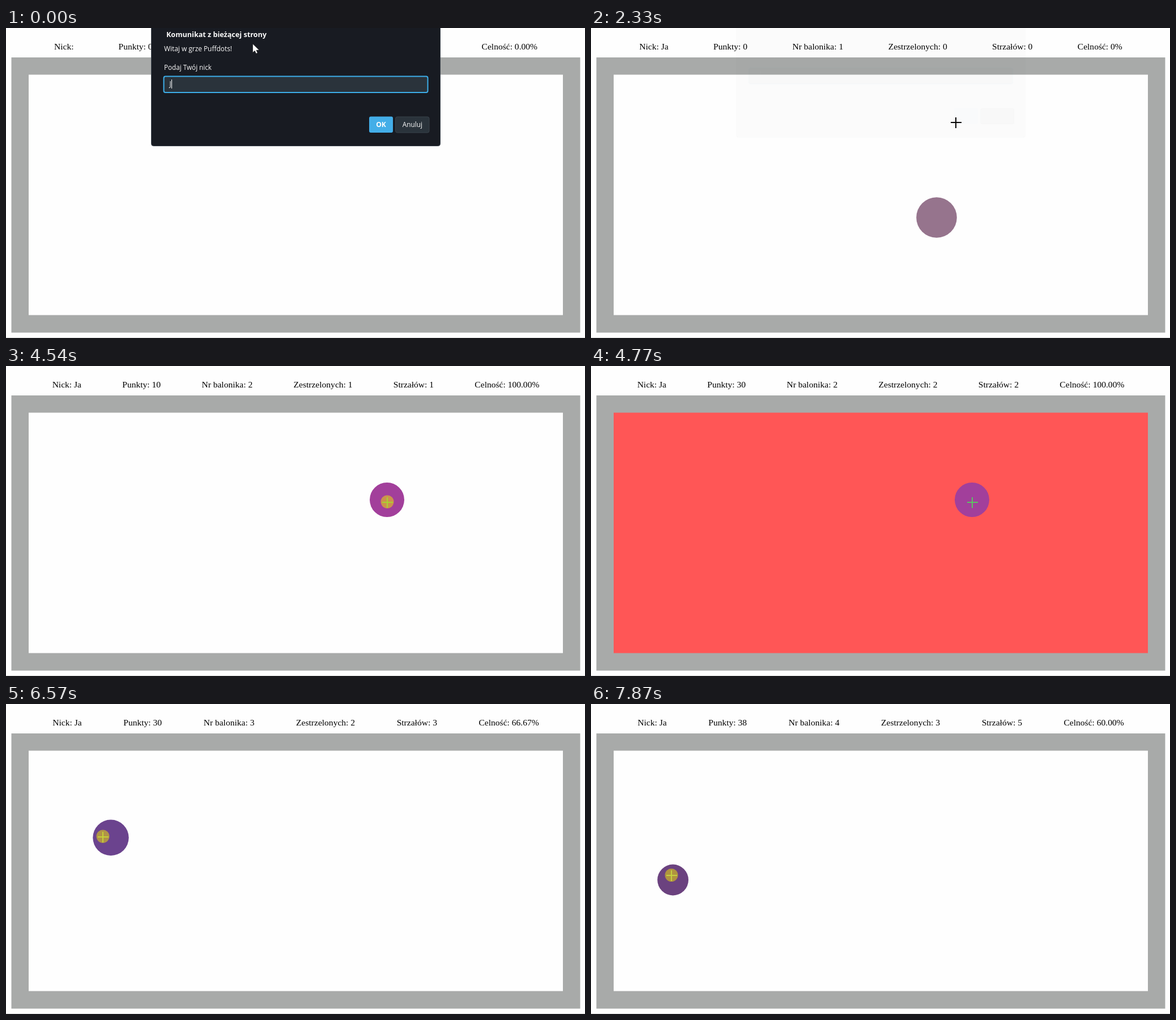
An HTML page with a canvas that plays this animation: 1022 by 548 pixels, repeating every 8000 ms.

```html
<!DOCTYPE html>
<html lang="pl">
<head>
<meta charset="utf-8">
<title>Gra zręcznościowa</title>
<style>
html, body { margin: 0; width: 100%; height: 100%; overflow: hidden; background: #fefefe; }
canvas { display: block; }
</style>
</head>
<body>
<canvas id="stage" width="1022" height="548"></canvas>
<script>
const ctx = document.getElementById('stage').getContext('2d');
const LOOP = 8000;
const SERIF = '15.55px "Liberation Serif", serif';
const sans = (size, weight = 400) => `${weight} ${size}px "Open Sans", sans-serif`;

// Pointer moves: first update, last update, number of updates, destination
const moves = [
  [610, 1390, 11, 616, 157],
  [1460, 1770, 5, 632, 154],
  [1920, 2020, 2, 644, 167],
  [2640, 2960, 5, 598, 270],
  [3040, 3120, 2, 612, 313],
  [3770, 4390, 9, 673, 241],
  [4998, 5460, 7, 266, 228],
  [5540, 5700, 3, 223, 235],
  [5780, 5780, 1, 220, 235],
  [6330, 6400, 2, 171, 235],
  [7120, 7340, 4, 131, 288],
  [7570, 7720, 3, 142, 303]
];

// Click highlights: from, to, centre
const clicks = [
  [3360, 3530, 611.5, 312],
  [4540, 4770, 673, 240],
  [6010, 6160, 219, 234],
  [6570, 6720, 171, 234],
  [7870, 8000, 142, 302.5]
];

const flashes = [[3530, 3690], [4770, 4920], [6720, 6870]];

// Discs to shoot: appearance, centre, radius, colour
const discs = [
  [2170, 610, 335, 35.8, '#96748d'],
  [3690, 672.5, 236.5, 30.5, '#a23f9b'],
  [4920, 185, 236.3, 31.7, '#6b438e'],
  [6870, 144.6, 311, 27.4, '#6b427f']
];

// Scores: time, nick, points, disc number, hits, shots, accuracy
const scores = [
  [0, '', 0, 0, 0, 0, '0.00%'],
  [2170, ' Ja', 0, 1, 0, 0, '0%'],
  [3530, ' Ja', 10, 1, 1, 1, '100.00%'],
  [3690, ' Ja', 10, 2, 1, 1, '100.00%'],
  [4770, ' Ja', 30, 2, 2, 2, '100.00%'],
  [4920, ' Ja', 30, 3, 2, 2, '100.00%'],
  [6160, ' Ja', 30, 3, 2, 3, '66.67%'],
  [6720, ' Ja', 38, 3, 3, 4, '75.00%'],
  [6870, ' Ja', 38, 4, 3, 5, '60.00%']
];

const latest = (list, t) => list.filter(item => item[0] <= t).pop();
const active = (list, t) => list.find(([from, to]) => t >= from && t < to);

function rect(x, y, w, h, color) {
  ctx.fillStyle = color;
  ctx.fillRect(x, y, w, h);
}

function box(x, y, w, h, r, fill, stroke, line = 1) {
  ctx.beginPath();
  ctx.roundRect(x, y, w, h, r);
  ctx.fillStyle = fill;
  ctx.fill();
  if (!stroke) return;
  ctx.strokeStyle = stroke;
  ctx.lineWidth = line;
  ctx.stroke();
}

function circle(x, y, r, color) {
  ctx.beginPath();
  ctx.arc(x, y, r, 0, Math.PI * 2);
  ctx.fillStyle = color;
  ctx.fill();
}

function text(str, x, y, font, color, align = 'left') {
  ctx.font = font;
  ctx.fillStyle = color;
  ctx.textAlign = align;
  ctx.fillText(str, x, y);
}

function pointer(t) {
  let x = 435.5, y = 28;
  for (const [start, end, count, toX, toY] of moves) {
    if (t < start) break;
    const step = (end - start) / (count - 1) || 1;
    const p = Math.min(1, (Math.floor((t - start) / step + 1e-6) + 1) / count);
    const e = p * p * (3 - 2 * p);
    x += (toX - x) * e;
    y += (toY - y) * e;
  }
  return [x, y];
}

function drawHeader(t) {
  const [, nick, points, number, hits, shots, accuracy] = latest(scores, t);
  const labels = [`Nick:${nick}`, `Punkty: ${points}`, `Nr balonika: ${number}`,
    `Zestrzelonych: ${hits}`, `Strzałów: ${shots}`, `Celność: ${accuracy}`];
  ctx.font = SERIF;
  const widths = labels.map(label => ctx.measureText(label).width);
  const gap = (932 - widths.reduce((a, b) => a + b)) / labels.length;
  let x = 45.5 + gap / 2;
  labels.forEach((label, i) => {
    text(label, x, 38, SERIF, '#000');
    x += widths[i] + gap;
  });
}

function drawField(t) {
  rect(0, 0, 1022, 548, '#fefefe');
  rect(0, 547, 1022, 1, '#dcdcdc');
  rect(9.5, 52, 1004, 486.5, '#a8aaa9');
  rect(40, 82.5, 943, 425, active(flashes, t) ? '#ff5656' : '#fefefe');
  const disc = latest(discs, t);
  if (disc) circle(...disc.slice(1));
}

function drawDialog(t) {
  if (t >= 2410) return;
  ctx.save();
  if (t >= 2170) {
    const step = Math.floor((t - 2170) / 80);
    ctx.globalAlpha = [0.5, 0.15, 0.01][step] || 0;
    ctx.translate(0, -5 * (step + 1));
  }
  box(256.5, -20, 510, 228.5, 4, '#181b22', '#3c444d');
  text('Komunikat z bieżącej strony', 283, 16, sans(12.6, 700), '#fcfcfc');
  text('Witaj w grze Puffdots!', 279, 40.5, sans(11.9), '#fcfcfc');
  text('Podaj Twój nick', 279, 74, sans(11.7), '#fcfcfc');
  box(278.5, 85.5, 466, 28.5, 3, '#2a333b', '#3daee9', 2);
  text('J', 288.5, 103, sans(12), '#fcfcfc');
  if (t >= 70) text('a', 292, 103, sans(12), '#fcfcfc');
  const caretOn = t < 610 || Math.floor((t - 610) / 500) % 2 === 1;
  if (caretOn) rect(t < 70 ? 292 : 299, 91, 1, 16, '#fcfcfc');
  box(641, 156.5, 42, 28.5, 3, '#43aee8');
  text('OK', 662, 175, sans(12, 700), '#fff', 'center');
  box(687.5, 157, 59.5, 28, 3, '#2a333b', '#38424a');
  text('Anuluj', 717.3, 175, sans(11.8), '#fcfcfc', 'center');
  ctx.restore();
}

function drawArrow(x, y) {
  ctx.save();
  ctx.translate(x, y);
  ctx.beginPath();
  [[0, 0], [0, 15.5], [3.6, 12.2], [6, 17.2], [8.6, 16], [6.3, 11.3], [11.3, 11]]
    .forEach(point => ctx.lineTo(...point));
  ctx.closePath();
  ctx.fillStyle = '#fff';
  ctx.fill();
  ctx.strokeStyle = '#111';
  ctx.lineWidth = 0.6;
  ctx.stroke();
  ctx.restore();
}

// The crosshair inverts whatever lies beneath it
function drawCross(x, y) {
  x = Math.round(x);
  y = Math.round(y);
  ctx.save();
  ctx.globalCompositeOperation = 'difference';
  rect(x - 9, y - 1, 19, 2, '#fff');
  rect(x - 1, y - 9, 2, 8, '#fff');
  rect(x - 1, y + 1, 2, 9, '#fff');
  ctx.restore();
}

function draw(t) {
  drawField(t);
  drawHeader(t);
  drawDialog(t);
  const [x, y] = pointer(t);
  if (t < 2170) drawArrow(x, y);
  else drawCross(x, y);
  const click = active(clicks, t);
  if (click) circle(click[2], click[3], 11.5, 'rgba(246, 230, 0, 0.5)');
}

const began = performance.now();
function tick() {
  draw((performance.now() - began) % LOOP);
  requestAnimationFrame(tick);
}
tick();
</script>
</body>
</html>
```
